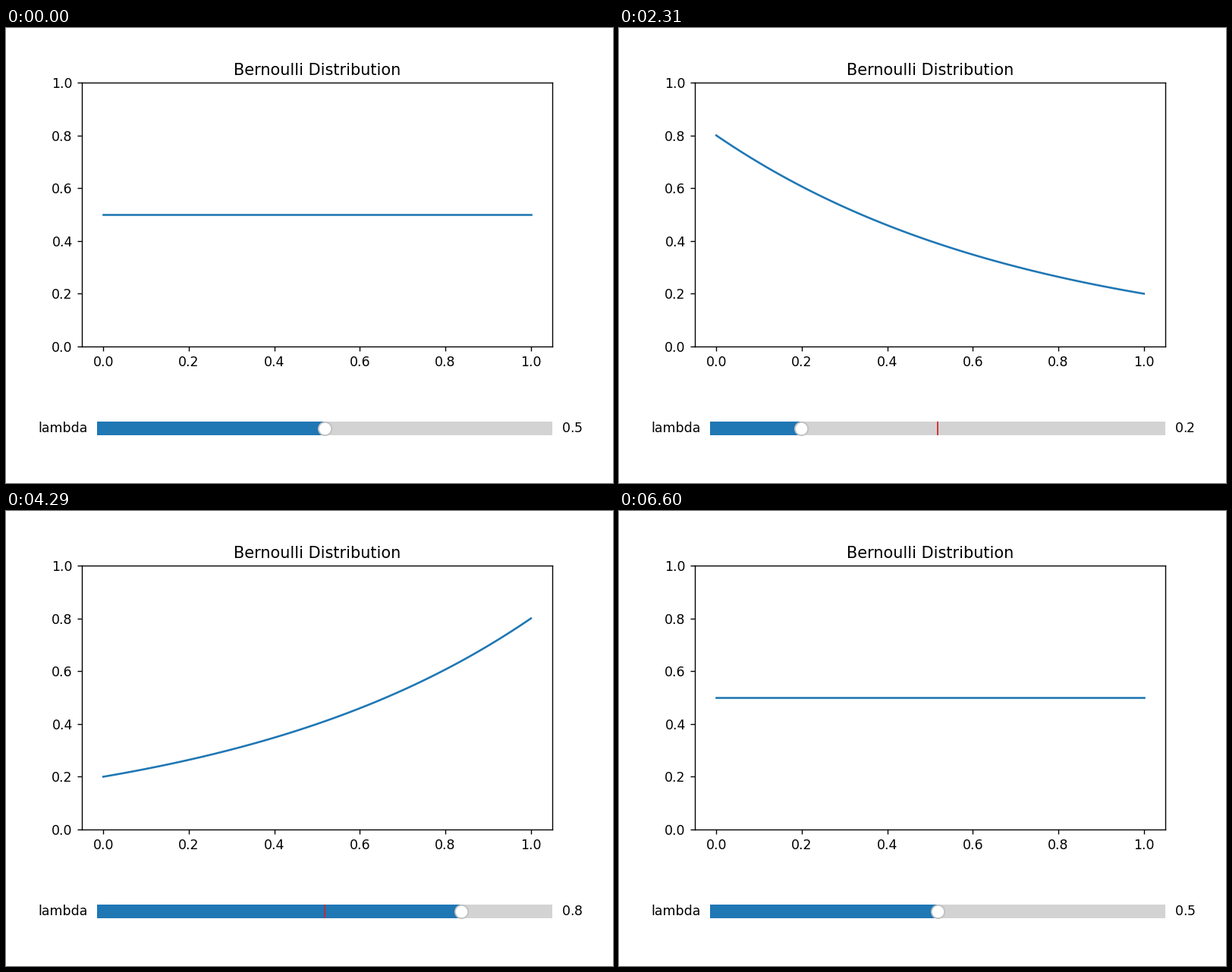
A matplotlib script that plays this animation: 800 by 600 pixels, repeating every 6.93 s.

```python
import numpy as np
import matplotlib.pyplot as plt
from matplotlib.animation import FuncAnimation
from matplotlib.widgets import Slider

FRAMES, INTERVAL = 21, 330
START = 0.5

plt.rcParams["font.family"] = "DejaVu Sans"

k = np.linspace(0, 1, 100)


def bernoulli(lam):
    return lam ** k * (1 - lam) ** (1 - k)


def lam_at(n):
    """Triangle wave: 0.5 down to 0, up to 1, back to 0.5."""
    return min(abs(n - 5), 25 - n) / 10


fig, ax = plt.subplots(figsize=(6.4, 4.8), dpi=125)
fig.subplots_adjust(bottom=0.3)
line, = ax.plot(k, bernoulli(START))
ax.set_title("Bernoulli Distribution")
ax.set_xlim(-0.05, 1.05)
ax.set_ylim(0, 1)

slider_ax = fig.add_axes([0.15, 0.09, 0.75, 0.06])
slider = Slider(slider_ax, "lambda", 0, 1, valinit=START, initcolor="#d62020")
slider.drawon = False


def update(n):
    lam = lam_at(n)
    slider.set_val(lam)
    line.set_ydata(bernoulli(lam))
    return line,


anim = FuncAnimation(fig, update, frames=FRAMES, interval=INTERVAL,
                     repeat=True, repeat_delay=0)
plt.show()
```
